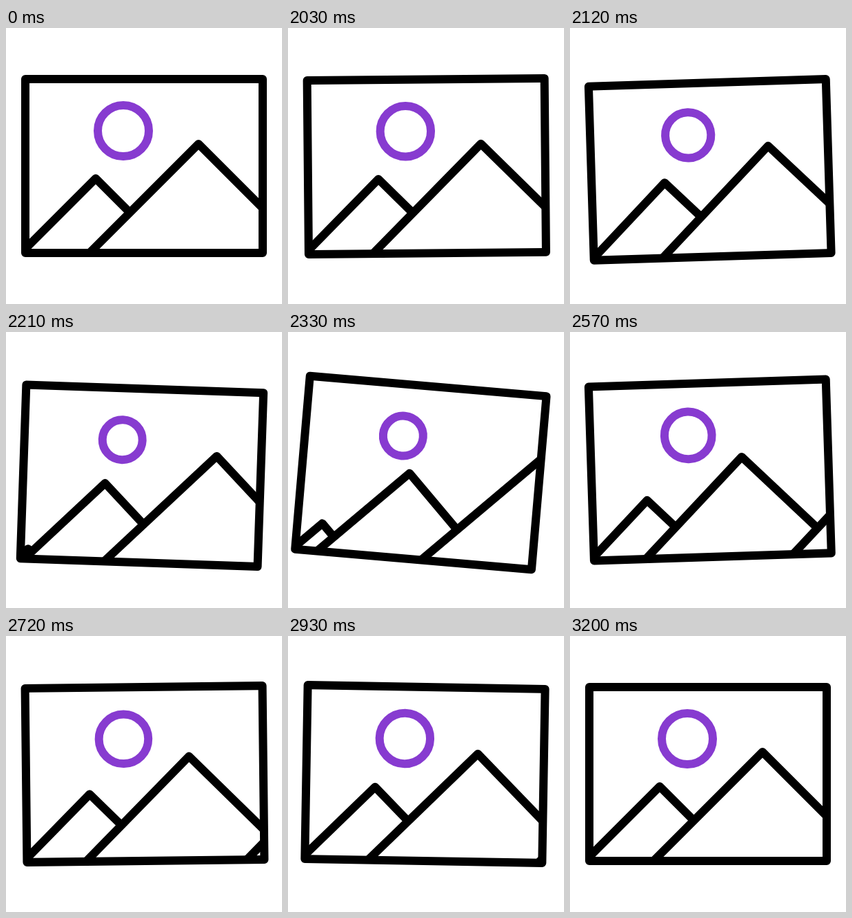
Write an HTML page with a canvas that moves like this. It is 400 px wide and 400 px high and loops after 3.23 s.

```html
<!DOCTYPE html>
<html>
<head>
<meta charset="utf-8">
<style>
  html, body { margin: 0; width: 100%; height: 100%; overflow: hidden; background: #fff; }
  canvas { display: block; width: 100vw; height: 100vh; }
</style>
</head>
<body>
<canvas width="400" height="400"></canvas>
<script>
const ctx = document.querySelector('canvas').getContext('2d');
const LOOP = 3230, HOLD = 2030, STEP = 30;

const mix = (a, b, k) => a + (b - a) * k;
const sine = u => (1 - Math.cos(Math.PI * u)) / 2;

// Ease along a cubic Bezier whose handles are (x1, 0) and (x2, 1).
const bezier = (x1, x2) => u => {
  let lo = 0, hi = 1;
  for (let i = 0; i < 24; i++) {
    const s = (lo + hi) / 2, r = 1 - s;
    if (3 * s * r * (r * x1 + s * x2) + s ** 3 < u) lo = s; else hi = s;
  }
  return lo * lo * (3 - 2 * lo);
};

// Keys are [time, value, ease into this key].
function track(keys, t) {
  if (t <= keys[0][0]) return keys[0][1];
  for (let i = 1; i < keys.length; i++) {
    const [t0, v0] = keys[i - 1], [t1, v1, ease = sine] = keys[i];
    if (t < t1) return mix(v0, v1, ease((t - t0) / (t1 - t0)));
  }
  return keys[keys.length - 1][1];
}

const tilt = [[2000, 0], [2090, -2.1], [2310, 5], [2588, -1.9], [2880, 1.05], [3170, 0]];
const drop = [[2000, 0], [2200, 8.3], [2465, 0]];
const radius = [[2000, 37], [2260, 28.2], [3160, 37, bezier(.17, .1)]];
const slide = [[2020, 0], [3130, 1, bezier(.36, .195)]];

function stroke(points) {
  ctx.beginPath();
  points.forEach(([x, y]) => ctx.lineTo(x, y));
  ctx.stroke();
}

// All slopes are 45 degrees; each right slope stops at the next mountain.
function mountains(p) {
  const sag = 27 * p * p * (1 - p);
  const peaks = [
    [mix(27, 130, p), mix(323.5, 218, p)],
    [mix(130, 279, p), mix(218, 168, p) + sag],
    [mix(279, 529, p), 168]
  ];
  peaks.forEach(([x, y], i) => {
    const next = peaks[i + 1];
    const endX = next ? (x - y + next[0] + next[1]) / 2 : x + 170;
    stroke([[x + y - 335, 335], [x, y], [endX, endX - x + y]]);
  });
}

function draw(t) {
  ctx.fillStyle = '#fff';
  ctx.fillRect(0, 0, 400, 400);
  ctx.save();
  ctx.translate(200, 111 + track(drop, t));
  ctx.rotate(track(tilt, t) * Math.PI / 180);
  ctx.translate(-200, -111);
  ctx.lineWidth = 12;
  ctx.lineJoin = 'round';

  ctx.strokeStyle = '#873bd0';
  ctx.beginPath();
  ctx.arc(170, 149, track(radius, t), 0, 2 * Math.PI);
  ctx.stroke();

  ctx.strokeStyle = '#000';
  ctx.save();
  ctx.beginPath();
  ctx.rect(28, 74, 344, 252);
  ctx.clip();
  mountains(track(slide, t));
  ctx.restore();
  ctx.strokeRect(28, 74, 344, 252);
  ctx.restore();
}

const start = performance.now();
function tick() {
  const t = (performance.now() - start) % LOOP;
  draw(t < HOLD ? 0 : HOLD + STEP * Math.floor((t - HOLD) / STEP));
  requestAnimationFrame(tick);
}
tick();
</script>
</body>
</html>
```
